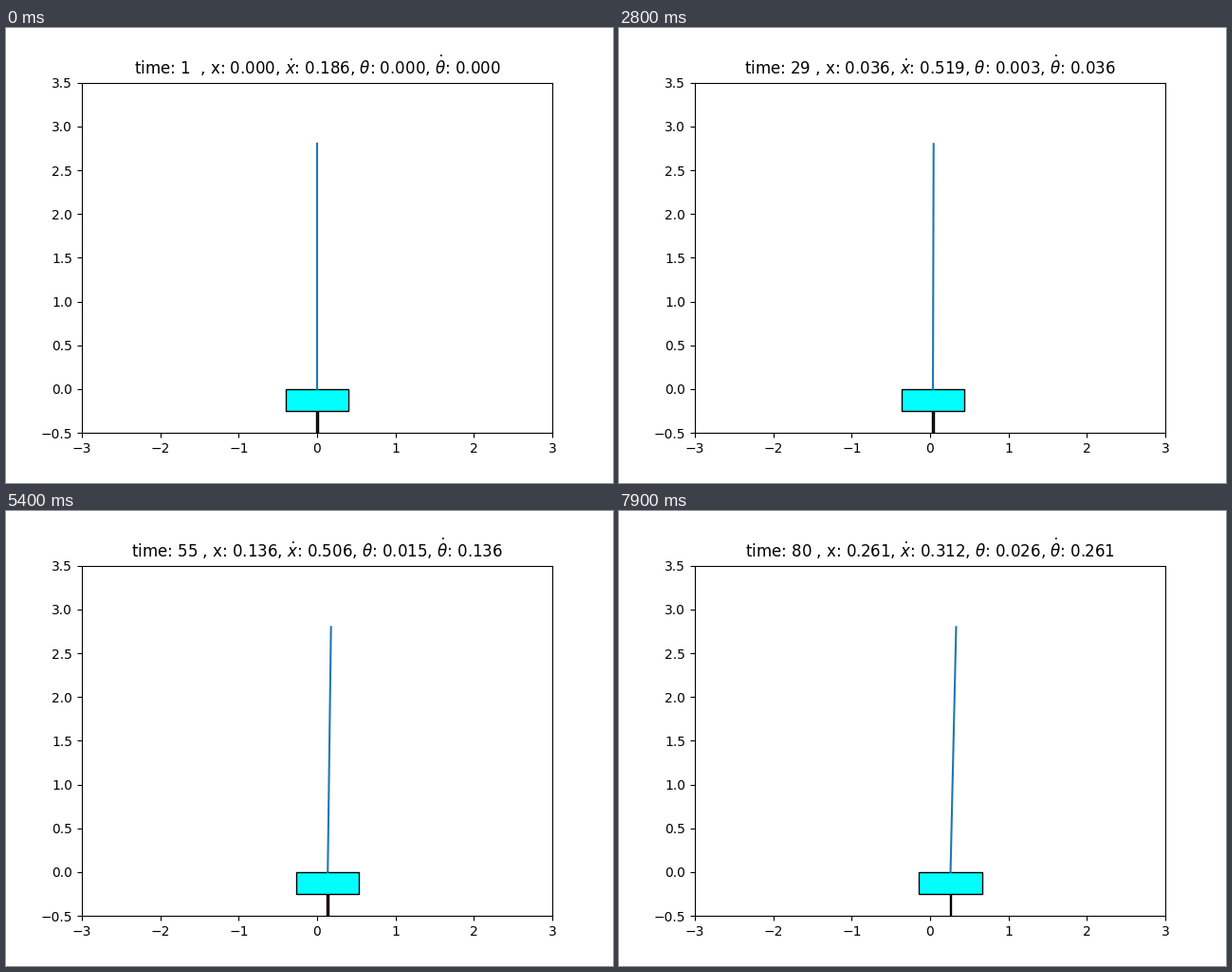
Recreate the animation shown at these times as a matplotlib script. Size 640x480 px, loop 8000 ms.

```python
import math

import matplotlib.pyplot as plt
from matplotlib.animation import FuncAnimation
from matplotlib.patches import Rectangle

GRAVITY, CART_MASS, POLE_MASS, HALF_POLE = 9.8, 1.0, 0.3, 0.7
FORCE, TAU = 10.0, 0.02
CART_W, CART_H, POST_W, POLE_LEN = 0.8, 0.25, 0.02, 2.8

# Lengths of the alternating bursts of pushes, the first one to the right.
RUNS = [2, 7, 8, *[1] * 12, 5, 5, *[1] * 6, 4, 4, *[1] * 6, 4, 4, 1, 1, 1, 2, 5, 3]


def pushes():
    sign = 1
    for run in RUNS:
        yield from [sign * FORCE] * run
        sign = -sign


def step(state, force):
    """One Euler step of the cart-pole equations."""
    x, v, a, w = state
    mass = CART_MASS + POLE_MASS
    moment = POLE_MASS * HALF_POLE
    sin, cos = math.sin(a), math.cos(a)
    temp = (force + moment * w * w * sin) / mass
    a_acc = (GRAVITY * sin - cos * temp) / (
        HALF_POLE * (4 / 3 - POLE_MASS * cos * cos / mass))
    x_acc = temp - moment * a_acc * cos / mass
    return x + TAU * v, v + TAU * x_acc, a + TAU * w, w + TAU * a_acc


def simulate():
    states, state = [], (0.0, 0.0, 0.0, 0.0)
    for force in pushes():
        state = step(state, force)
        states.append(state)
    return states


states = simulate()

fig, ax = plt.subplots(figsize=(6.4, 4.8), dpi=100)
ax.set_xlim(-3, 3)
ax.set_ylim(-0.5, 3.5)
post = ax.add_patch(Rectangle((0, -0.5), POST_W, 0.25, fc="darkred", ec="black"))
cart = ax.add_patch(Rectangle((0, -CART_H), CART_W, CART_H, fc="cyan", ec="black"))
pole, = ax.plot([], [], color="C0")
title = ax.set_title("")


def update(i):
    x, v, a, _ = states[i]
    post.set_x(x - POST_W / 2)
    cart.set_x(x - CART_W / 2)
    pole.set_data([x, x + POLE_LEN * math.sin(a)], [0, POLE_LEN * math.cos(a)])
    title.set_text(
        f"time: {i + 1:<3}, x: {x:.3f}, $\\dot{{x}}$: {v:.3f}, "
        f"$\\theta$: {a:.3f}, $\\dot{{\\theta}}$: {x:.3f}")
    return post, cart, pole, title


def init():
    return update(0)


anim = FuncAnimation(fig, update, frames=len(states), init_func=init,
                     interval=100, repeat=True, repeat_delay=0, blit=False)
plt.show()
```
